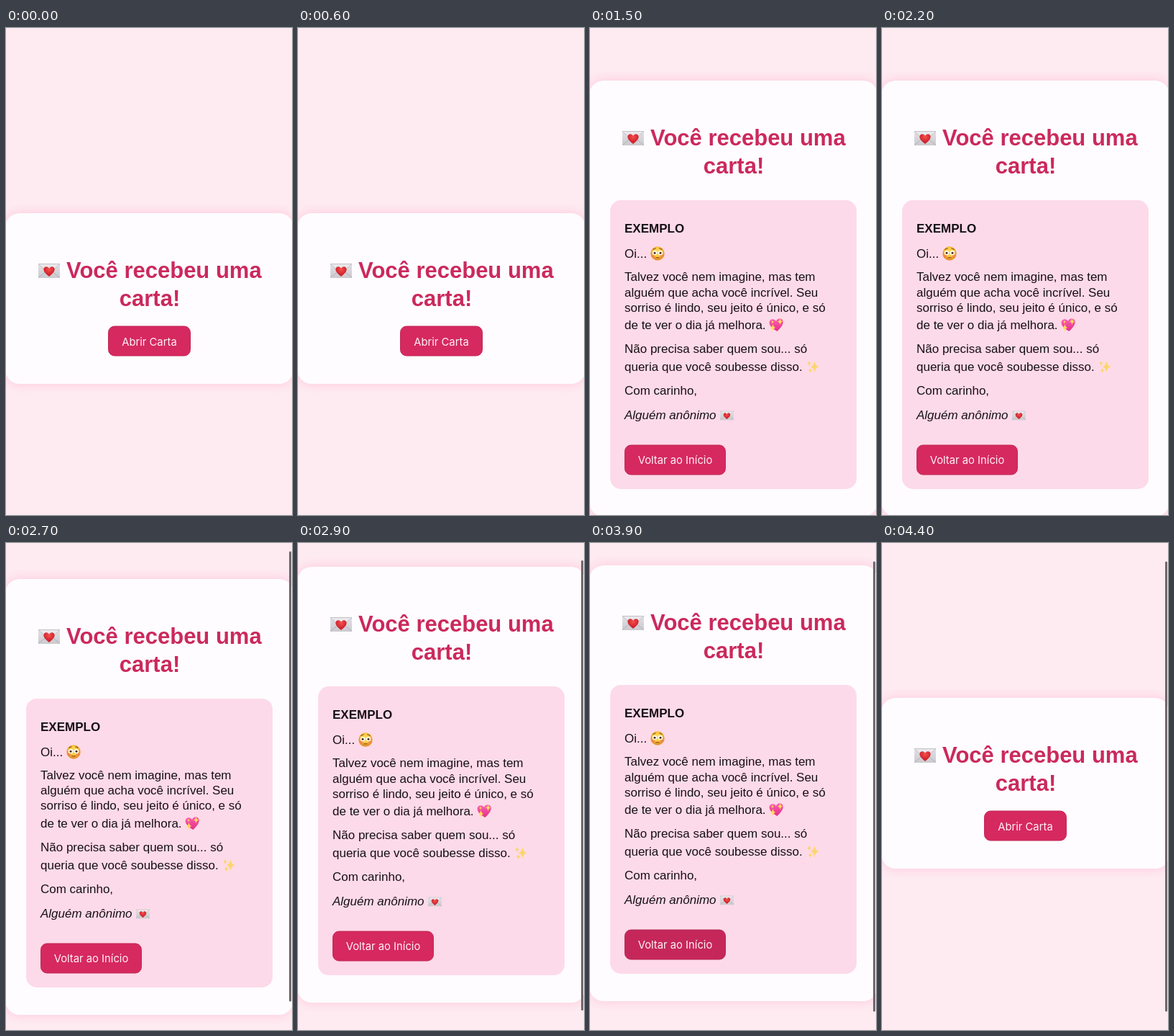
Write an HTML page that moves like this. It is 398 px wide and 676 px high and loops after 4800 ms.

```html
<!DOCTYPE html>
<html lang="pt-BR">
<head>
<meta charset="utf-8">
<title>Carta</title>
<style>
  html, body { margin: 0; width: 100%; height: 100%; overflow: hidden; background: #feebf2; }
  svg { display: block; }
  text { font: 17px "Liberation Sans", Arial, sans-serif; fill: #171015; }
  .title text { font-size: 31px; font-weight: bold; fill: #cb295d; }
  .button rect { fill: #d6295f; stroke: #c22857; }
  .button.pressed rect { fill: #c6275b; stroke: #b5264f; }
  .button text { font: 14.8px Inter, Roboto, sans-serif; fill: #fff2f7; text-anchor: middle; }
  #paper { fill: #fefcfe; filter: drop-shadow(0 0 8px rgba(255, 90, 145, .25)); }
</style>
</head>
<body>
<svg width="398" height="676" viewBox="0 0 398 676">
  <defs>
    <linearGradient id="silver" x2="0" y2="1">
      <stop stop-color="#e2e1e4"/><stop offset="1" stop-color="#cbcacf"/>
    </linearGradient>
    <radialGradient id="red" cy=".3">
      <stop stop-color="#f4504a"/><stop offset="1" stop-color="#d0222e"/>
    </radialGradient>
    <radialGradient id="yellow" cy=".4">
      <stop stop-color="#ffe26a"/><stop offset=".65" stop-color="#fbc640"/><stop offset="1" stop-color="#e5942a"/>
    </radialGradient>
    <linearGradient id="pink" x2="0" y2="1">
      <stop stop-color="#fb63ae"/><stop offset="1" stop-color="#e52c86"/>
    </linearGradient>
    <path id="heart" d="M0 8C-4 5-8.5 1-8.5-3C-8.5-8-2-9 0-4.5C2-9 8.5-8 8.5-3C8.5 1 4 5 0 8Z"/>
    <path id="star" d="M0-8Q1-1 6 0Q1 1 0 8Q-1 1-6 0Q-1-1 0-8Z"/>
    <g id="envelope">
      <rect x="-15" y="-10" width="30" height="20" rx="1" fill="url(#silver)"/>
      <path d="M-15 9.5L-3 0M15 9.5L3 0" stroke="#b4b2b8" fill="none"/>
      <path d="M-15-9.5L0 4L15-9.5Z" fill="#e9e8eb" stroke="#bcbac0" stroke-width=".8"/>
      <use href="#heart" transform="translate(0 .8) scale(.9)" fill="url(#red)"/>
    </g>
  </defs>

  <g id="card">
    <rect id="paper" x="-1" width="401" rx="20"/>
    <g class="title">
      <use href="#envelope" x="60" y="80"/>
      <text x="84" y="90">Você recebeu uma</text>
      <text x="200" y="129" text-anchor="middle">carta!</text>
    </g>

    <g id="closed" class="button">
      <rect x="142.5" y="157" width="114" height="41" rx="8.5"/>
      <text x="199.5" y="183.5">Abrir Carta</text>
    </g>

    <g id="open">
      <rect x="28" y="166" width="343" height="401" rx="15" fill="#fddae9"/>
      <g id="lines"></g>

      <g transform="translate(94 240)">
        <circle r="9.7" fill="url(#yellow)"/>
        <g fill="#f47b55" opacity=".65">
          <ellipse cx="-6" cy="3.6" rx="2.6" ry="1.8"/><ellipse cx="6" cy="3.6" rx="2.6" ry="1.8"/>
        </g>
        <g fill="#fff"><circle cx="-4" cy="-.8" r="3.1"/><circle cx="4" cy="-.8" r="3.1"/></g>
        <g fill="#4a2c1c"><circle cx="-4" cy="-.8" r="1.5"/><circle cx="4" cy="-.8" r="1.5"/></g>
        <path d="M-6-5.6Q-4.5-7.3-2.7-7M6-5.6Q4.5-7.3 2.7-7M-2.2 5.8H2.2"
              fill="none" stroke="#7a451c" stroke-width="1.1" stroke-linecap="round"/>
      </g>

      <g transform="translate(259.5 339)">
        <use href="#heart" transform="rotate(-6) scale(1.13)" fill="url(#pink)"/>
        <g fill="#ffdc5c">
          <use href="#star" transform="translate(-5 4) scale(.65)"/>
          <use href="#star" transform="translate(5 -4.5) scale(.6)"/>
          <use href="#star" transform="translate(-5.5 -4) scale(.3)"/>
        </g>
      </g>

      <g transform="translate(311 397)" fill="#fbd66b">
        <use href="#star" x="1.5"/>
        <use href="#star" transform="translate(-6 -4.5) scale(.5)"/>
        <use href="#star" transform="translate(-4.5 5.5) scale(.45)"/>
      </g>

      <use href="#envelope" transform="translate(190.5 465) scale(.63)"/>
      <g id="back" class="button">
        <rect x="48.5" y="506" width="140" height="41" rx="8.5"/>
        <text x="118.5" y="532">Voltar ao Início</text>
      </g>
    </g>
  </g>
  <rect id="bar" x="394" width="3" height="625" rx="1.5" fill="#6f666b"/>
</svg>
<script>
const $ = id => document.getElementById(id);
const LOOP = 4800, STEP = 100, SCROLL = 42;

const lines = [
  [211, "EXEMPLO", "font-weight: bold"],
  [246, "Oi..."],
  [278, "Talvez você nem imagine, mas tem"],
  [299.5, "alguém que acha você incrível. Seu"],
  [320.5, "sorriso é lindo, seu jeito é único, e só"],
  [345, "de te ver o dia já melhora."],
  [378, "Não precisa saber quem sou... só"],
  [403, "queria que você soubesse disso."],
  [436, "Com carinho,"],
  [470, "Alguém anônimo", "font-style: italic"],
];
$("lines").innerHTML = lines.map(([y, words, style = ""]) =>
  `<text x="48" y="${y}" style="${style}">${words}</text>`).join("");

function scrollAt(t) {
  const p = Math.min(1, Math.max(0, (t - 2555) / 442));
  return SCROLL * (1 - (1 - p) ** 2);
}

function draw(now) {
  const t = Math.floor(now % LOOP / STEP) * STEP;
  const open = t >= 1400 && t < 4000;
  const scroll = scrollAt(t);

  $("card").setAttribute("transform", `translate(0 ${(open ? 73 : 257) - scroll})`);
  $("paper").setAttribute("height", open ? 605 : 237);
  $("open").style.display = open ? "" : "none";
  $("closed").style.display = open ? "none" : "";
  $("closed").classList.toggle("pressed", t === 1300);
  $("back").classList.toggle("pressed", t >= 3800 && t < 4000);
  $("bar").style.display = scroll > 0 ? "" : "none";
  $("bar").setAttribute("y", 25.5 - .735 * (SCROLL - scroll));
  requestAnimationFrame(draw);
}
requestAnimationFrame(draw);
</script>
</body>
</html>
```
